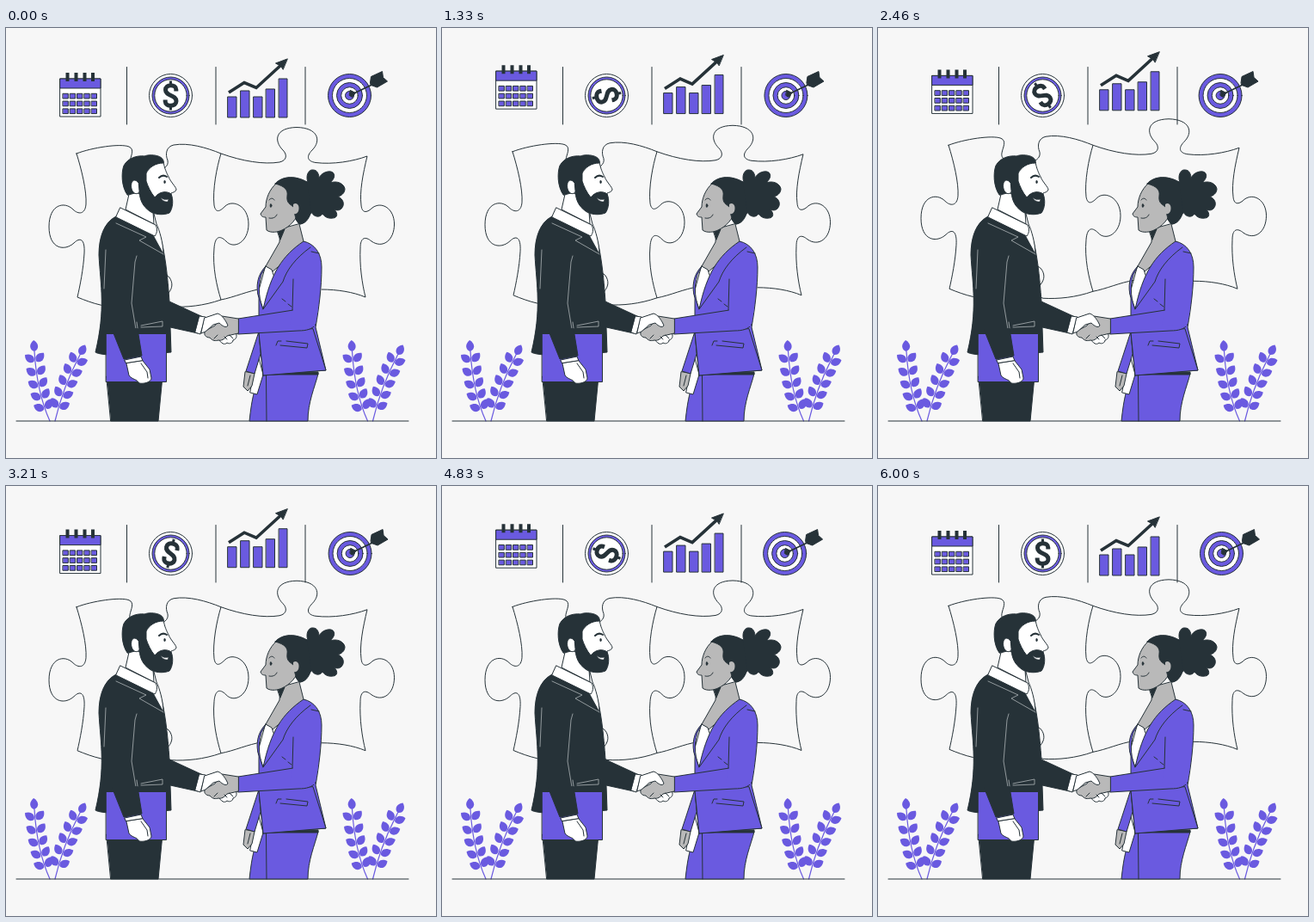
Animation, 500 px wide and 500 px high, one loop 6040 ms. Source, as an HTML page:

```html
<!DOCTYPE html>
<html lang="en">
<head>
<meta charset="utf-8">
<title>Business handshake</title>
<style>
html, body { margin: 0; width: 100%; height: 100%; overflow: hidden; background: #f7f7f7; }
svg { display: block; width: 100vw; height: 100vh; stroke: #263238; stroke-linecap: round; stroke-linejoin: round; }
.n { fill: none; }
.d { fill: #263238; }
.p { fill: #6a5ae0; }
.w { fill: #fff; }
.g { fill: #b9b9b9; }
.butt { fill: none; stroke-linecap: butt; }
.light { fill: none; stroke: #aeb4b7; stroke-width: .8; }
.leaf { fill: #6a5ae0; stroke: none; }
.stem { fill: none; stroke: #6a5ae0; stroke-width: 1.2; }
</style>
</head>
<body>
<svg viewBox="0 0 500 500">
  <g id="puzzle" class="n">
    <path d="M82 146C100 139 133 134 143 138C150 141 145 149 144 155C140 172 192 172 188 154C185 147 186 138 195 136C212 133 233 139 250 146C245 162 240 188 242 206C244 217 250 212 255 207C264 199 282 207 282 228C282 249 265 258 256 248C248 240 243 243 242 256C240 278 245 300 250 316C230 323 210 325 192 324C184 322 185 315 189 308C194 302 194 296 190 290C175 275 140 285 146 305C150 314 150 322 142 324C120 327 100 320 83 313C86 300 90 280 91 262C92 245 86 243 79 250C68 260 50 257 50 231C50 205 68 201 78 211C84 217 92 217 93 205C94 190 88 165 82 146Z"/>
    <path d="M250 146C275 155 300 159 318 156C327 154 327 147 322 142C311 131 313 116 338 115.500C363 116 367 131 356 142C349 149 350 155 360 156.500C380 159 404 155 420 149C415 170 411 190 413 206C414 217 421 214 426 209C437 201 451.500 210 451.500 228C451.500 247 438 257 425 248C418 242 412 243 412 256C411 276 414 297 418 313C404 307 385 304 367 304M250 316C266 313 280 306 298 303"/>
  </g>

  <g id="plants"></g>
  <path d="M12 457H468M140.500 45.500V112M244 45.500V112M348 45.500V112"/>

  <g id="calendar">
    <path class="w" d="M63 59H110V103H63Z"/>
    <path class="p" d="M63 59H110V70H63Z"/>
    <path class="butt" d="M71.500 52V62M81.500 52V62M91.500 52V62M101 52V62" stroke-width="4"/>
    <g id="days" class="p"></g>
  </g>

  <g transform="translate(191.500 78.500)">
    <circle class="w" r="25"/>
    <circle class="p" r="21.500"/>
    <circle class="w" r="18.700"/>
    <g id="dollar" class="butt">
      <path d="M6.300-5V-7C6-13.500-6-13.500-6-6.500C-6 1 6.500-1 6.500 6.500C6.500 13.500-6 13.500-6.300 7V5" stroke-width="5"/>
      <path d="M0-17V-11M0 11V17" stroke-width="3"/>
    </g>
  </g>

  <g id="chart">
    <path class="p" d="M258 80H268V104H258ZM273 73H283V104H273ZM288 80H298V104H288ZM302.500 71H312.500V104H302.500ZM317.500 59H327V104H317.500Z"/>
    <path class="butt" d="M259 75L277 63.500L291 69.500L321 42" stroke-width="3.600" stroke-linejoin="miter"/>
    <path class="d" d="M327 36L313.500 41L317 43L320 45L322 48Z"/>
  </g>

  <g id="target">
    <circle class="p" r="25"/><circle class="w" r="20"/>
    <circle class="p" r="15"/><circle class="w" r="9.800"/>
    <circle class="p" r="5"/>
    <path d="M2-1L27-13" stroke-width="1.800"/>
    <path class="d" d="M1-6L7-3L3 2L0 0ZM24-15L25-22L38-28L39-21L44-16.500L32-9.500L25-12Z"/>
  </g>

  <g id="man">
    <path class="d" d="M117 405H182L177 457H122Z"/>
    <path class="d" d="M128 219C114 226 108 243 108 264C110 300 116 327 104 377C110 381 140 382 192 377L191 348L223 355L229 336L190 318C188 290 185 258 178 239Z"/>
    <path class="w" d="M172 216L175 228C178 234 183 250 183 263L171 241L160 236Z"/>
    <path class="w" d="M144 189L139 211L172 228L171 214L160 195Z"/>
    <path class="w" d="M133 209L174 229C177 235 175 239 173 242L128 220Z"/>
    <path class="w" d="M160 160L183 155C184 163 187 169 189 173C192 180 198 185 198 188C197 191 194 191 192 192L190 206L165 204L153 190Z"/>
    <path class="d" d="M141 194C134 184 134 168 137 160C142 151 152 148 161 149C168 146 185 148 183 157C174 157 166 162 163 169L163 178C165 184 168 191 173 197C178 190 187 189 192 193C195 200 194 210 190 215C183 218 172 217 167 213C159 207 156 201 155 191Z"/>
    <path class="w" d="M154 180C149 173 144 179 146 187C148 194 154 194 155 190Z"/>
    <path class="w" d="M180 197C183 200 186 200 189 199L188 202C184 202 181 200 180 197Z" stroke-width=".5"/>
    <path class="n" d="M178 174C181 171 184 171 187 173" stroke-width="2"/>
    <ellipse class="d" cx="184.500" cy="179" rx=".6" ry="1.800"/>
    <path class="light" d="M128 227L163 243L155 247L183 263M116 258L114 303M152 265L150 272L146 320L151 350M152 342L153 349M157 346L182 341V347L157 348"/>
    <path class="p" d="M116.500 355.500H186.500V411.500H116.500Z"/>
    <path class="d" d="M123 350L137 385L158 381L153 350Z"/>
    <path class="w" d="M138 386L157 382L159 387L140 390Z"/>
    <path class="w" d="M140 390L143 404C147 409 152 408 155 413C160 414 169 412 169 407L167 397L159 387Z"/>
    <path class="n" d="M157 390L164 400L165 407"/>
    <path class="w" d="M225 335L232 336L226 356L220 354Z"/>
  </g>

  <g id="woman">
    <path class="p" d="M298 403C289 415 286 430 283 457H351C351 435 359 418 363 402Z"/>
    <path class="n" d="M302.500 404L303 457"/>
    <path class="w" d="M293 380L299 403L292 426L284 424Z"/>
    <path class="g" d="M278 400L276 417L281 422L286 416L289 402Z"/>
    <path class="n" d="M284 404L281 416"/>
    <path class="p" d="M294 353L279 399L289 402L296 379Z"/>
    <path class="g" d="M319 234L318 249L302 277L309 284L347 252L341 228Z"/>
    <path class="d" d="M316 237L324 234L319 246Z"/>
    <path class="w" d="M302 277L309 281L312 290L299 327L293 309Z"/>
    <path class="p" d="M302 277C292 287 290 301 294 314L294 354L299 404L372 398L360 348C364 325 367 301 367 278C367 262 359 251 346 248C321 265 308 285 299 327C295 318 292 302 297 287Z"/>
    <path class="d" d="M299 401L363 400V403H299Z"/>
    <path class="p" d="M294 354L299 404L372 398L357 350Z"/>
    <path class="p" d="M270 338L334 328L360 345C356 350 350 352 340 352L270 356Z"/>
    <path class="p" d="M334 326L363 326L359 347L330 345Z" stroke="none"/>
    <path class="n" d="M334 292L333 328M354 255C336 268 326 282 322 295L299 327M355 260L364 262M321 315L325 318M328 321L332 324M314 369L316 364H320M326 364L351 367L350 372L319 369"/>
    <path class="d" d="M342 190C342 182 346 178 351 179C348 172 352 164 357 165C362 165 364 170 364 175C366 168 376 165 380 168C384 172 380 177 377 180C385 177 393 181 394 187C394 192 390 195 386 196C393 199 394 206 390 210C387 213 383 212 381 210C387 216 385 221 380 221C374 222 370 219 368 216C365 221 358 220 355 214C351 224 348 227 342 228C334 223 333 210 331 207Z"/>
    <path class="g" d="M314 181C306 188 302 199 302 208L296 216C297 220 300 220 302 220L303 235C308 239 317 237 321 235C330 231 338 223 342 210L330 185Z"/>
    <path class="d" d="M313 181C322 171 338 172 350 179L355 214C350 222 347 228 341 228C337 224 335 216 335 209C330 204 326 204 327 195C328 189 325 184 313 181Z"/>
    <path class="g" d="M334 205C338 202 342 206 340 213C338 217 335 217 334 215Z" stroke="none"/>
    <ellipse class="d" cx="308" cy="206.500" rx=".8" ry="2"/>
    <path class="n" d="M306 221C310 222 314 220 315 217M306 200C308 197 311 198 312 200"/>
  </g>

  <g id="hands">
    <path class="w" d="M247 361C250 367 254 369 257 366C260 368 264 366 264 363C268 362 269 358 267 354L257 351Z"/>
    <path class="g" d="M270 338L251 335L243 346L232 352C229 356 232 360 237 360C240 364 244 364 247 363C250 364 254 362 257 358L270 355Z"/>
    <path class="w" d="M231 337L246 332C251 333 256 341 258 346C256 349 252 347 248 343L241 345L232 353L227 355Z"/>
    <path class="n" d="M257 362L254 359M264 361L260 357M242 361L246 357"/>
  </g>
</svg>

<script>
const $ = id => document.getElementById(id);
const LOOP = 6040;

let cells = '';
for (let row = 0; row < 3; row++)
  for (let col = 0; col < 5; col++)
    cells += `<rect x="${66.3 + col * 8.3}" y="${76.3 + row * 8.8}" width="6" height="5.700"/>`;
$('days').innerHTML = cells;

const leaf = (x, y, angle, stalk) =>
  `<path class="leaf" d="M0 0C2-6 9-6 13 0C9 6 2 6 0 0" transform="translate(${x} ${y}) rotate(${angle}) translate(${stalk} 0)"/>`;

// A curved stem with five leaf pairs and one leaf at the tip
function branch(x0, y0, cx, cy, x1, y1) {
  let out = `<path class="stem" d="M${x0} ${y0}Q${cx} ${cy} ${x1} ${y1}"/>`;
  for (let i = 0; i <= 5; i++) {
    const u = i < 5 ? .18 + i * .17 : 1, v = 1 - u;
    const x = v * v * x0 + 2 * u * v * cx + u * u * x1;
    const y = v * v * y0 + 2 * u * v * cy + u * u * y1;
    const angle = Math.atan2(v * (cy - y0) + u * (y1 - cy), v * (cx - x0) + u * (x1 - cx)) * 180 / Math.PI;
    out += i < 5 ? leaf(x, y, angle - 47, 2) + leaf(x, y, angle + 47, 2) : leaf(x, y, angle, 0);
  }
  return out;
}
const bush = branch(51, 457, 36, 424, 33, 376) + branch(57, 457, 66, 418, 86, 380);
$('plants').innerHTML = bush + `<g transform="translate(369.500 0)">${bush}</g>`;

// Linear 0 → 1 → 0 over each period
const wave = (t, period) => 1 - Math.abs(1 - 2 * (t % period) / period);
const place = (id, value) => $(id).setAttribute('transform', value);
const float = (id, amount) => place(id, `translate(0 ${-10 * amount})`);

function draw(now) {
  const t = now % LOOP;
  float('calendar', wave(t, 3000));
  float('chart', wave(t, 6000));
  float('puzzle', wave(Math.max(0, t - 1000), 3000));
  place('dollar', `rotate(${t * .06})`);
  place('target', `translate(${399.5 + 4 * (wave(t + 750, 3000) - .5)} 78.500)`);
  requestAnimationFrame(draw);
}
draw(0);
</script>
</body>
</html>
```
